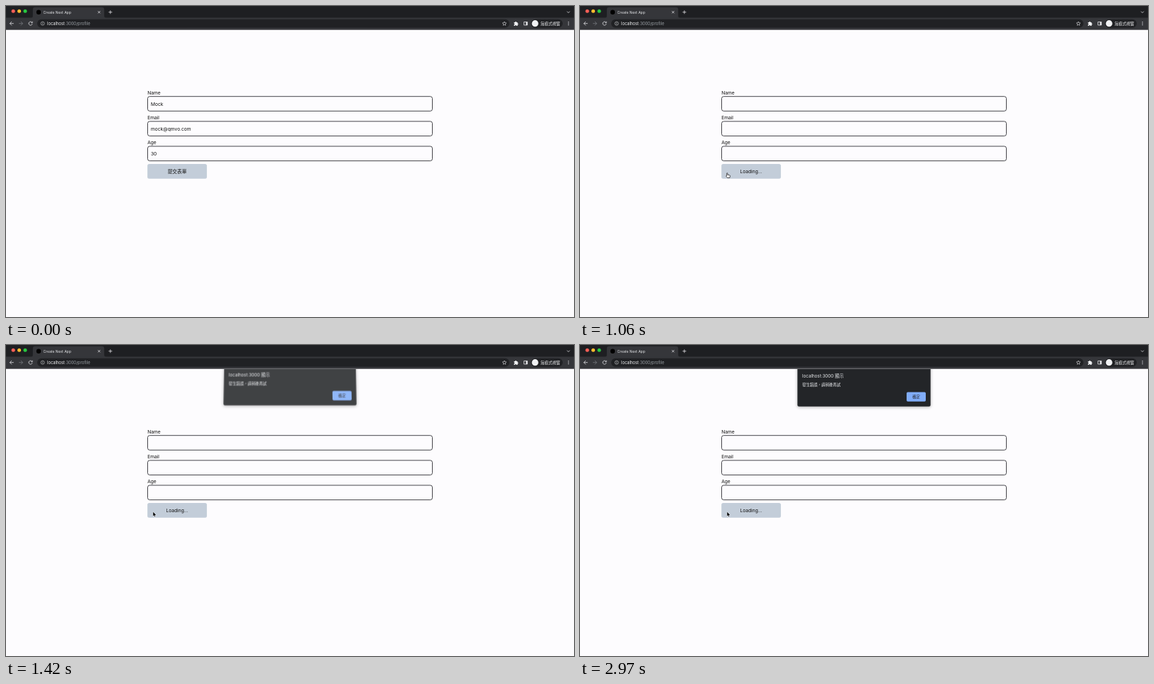
Recreate the animation shown at these times as an HTML page. Size 800 by 439 pixels, loop 3000 ms.

```html
<!DOCTYPE html>
<html lang="zh-Hant">
<head>
<meta charset="utf-8">
<title>Profile form</title>
<style>
  html, body { margin: 0; width: 800px; height: 439px; overflow: hidden; background: #fdfcfe; }
  svg { position: absolute; left: 0; top: 0; display: block; }
  text { font-family: Inter, "Noto Sans CJK TC", "Noto Sans CJK", sans-serif; white-space: pre; }
  .page text { font-size: 6.67px; fill: #111; }
  .icon { fill: none; stroke: #e2e3e6; stroke-width: .8; }
  .field { fill: #fdfcfe; stroke: #25252b; stroke-width: .85; }
  .clip { position: absolute; left: 0; top: 33.5px; width: 800px; height: 120px; overflow: hidden; }
  #dialog { left: 300px; top: -33.5px; overflow: visible; transform-origin: 100px 87px;
            filter: drop-shadow(0 1px 2px #0005); }
</style>
</head>
<body>
<svg width="800" height="439">
  <!-- tab strip -->
  <rect width="800" height="17" fill="#1e1f22"/>
  <circle cx="10.2" cy="7.2" r="2.5" fill="#ff5f57"/>
  <circle cx="18.6" cy="7.2" r="2.5" fill="#febc2e"/>
  <circle cx="27" cy="7.2" r="2.5" fill="#28c840"/>
  <path d="M34.5 17q3.3 0 3.3-3.3V5q0-3.3 3.3-3.3H135q3.3 0 3.3 3.3v8.700q0 3.300 3.300 3.300z" fill="#35363a"/>
  <circle cx="46" cy="8.7" r="3.2" fill="#000"/>
  <text x="52.6" y="10.5" font-size="5" fill="#e8eaed">Create Next App</text>
  <path class="icon" d="M129.500 7.100l3.200 3.200m0-3.200l-3.200 3.200M144.500 8.700h5m-2.500-2.500v5M790.200 7.700l1.900 1.900 1.900-1.900"/>

  <!-- toolbar -->
  <rect y="16.500" width="800" height="17.200" fill="#35363a"/>
  <rect x="44" y="18.700" width="665" height="12" rx="6" fill="#202124"/>
  <path class="icon" d="M10.800 24.700H5.400m2.700-2.700l-2.700 2.700 2.700 2.700"/>
  <path class="icon" d="M18.200 24.700h5.400m-2.700-2.700l2.700 2.700-2.700 2.700" style="stroke:#77797e"/>
  <path class="icon" d="M36.600 23.200a2.500 2.500 0 1 0 .4 2M37.200 21.800v1.900h-1.900"/>
  <circle class="icon" cx="51.600" cy="24.700" r="2.500" style="stroke-width:.55"/>
  <path class="icon" d="M51.600 24.400v1.600m0-2.900v.7" style="stroke-width:.6"/>
  <text x="58" y="26.700" font-size="5.800" fill="#f1f2f4">localhost<tspan fill="#9aa0a6">:3000/profile</tspan></text>
  <path class="icon" d="M702 22l.8 1.800 2 .2-1.500 1.300.4 2-1.700-1-1.700 1 .4-2-1.500-1.300 2-.2z" style="stroke-width:.6"/>
  <path d="M715.500 23h1.500a1 1 0 0 1 2 0h1.500v1.500a1 1 0 0 1 0 2V28h-1.700a.9.9 0 0 0-1.800 0h-1.500v-1.700a.9.9 0 0 0 0-1.800z" fill="#f1f2f4"/>
  <path class="icon" d="M729.500 22.500h4.800v4.500h-4.800z"/>
  <path d="M732.300 22.500h2v4.500h-2z" fill="#e2e3e6"/>
  <rect x="739.500" y="18.700" width="44.500" height="12" rx="6" fill="#202124"/>
  <circle cx="745.200" cy="24.700" r="4.600" fill="#f1f2f4"/>
  <text x="753" y="26.700" font-size="5.500" font-weight="500" fill="#f1f2f4">無痕式視窗</text>
  <g fill="#e2e3e6">
    <circle cx="792.200" cy="22.700" r=".6"/>
    <circle cx="792.200" cy="24.700" r=".6"/>
    <circle cx="792.200" cy="26.700" r=".6"/>
  </g>

  <!-- form -->
  <g class="page">
    <g id="fields"></g>
    <rect x="199.200" y="222.900" width="83.700" height="20.900" rx="2.500" fill="#c3cdd9"/>
    <text id="label" x="241" y="235.700" text-anchor="middle"></text>
  </g>
</svg>

<div class="clip">
  <svg id="dialog" width="200" height="110" viewBox="300 0 200 110">
    <rect x="306.300" y="24" width="187.400" height="62.700" rx="2" fill="#232528"/>
    <g fill="#e8eaed">
      <text x="313" y="45.700" font-size="6.250">localhost:3000 顯示</text>
      <text x="313" y="57.800" font-size="5.420" font-weight="500">發生錯誤，請稍後再試</text>
    </g>
    <rect x="460" y="66.500" width="27" height="13.300" rx="1.700" fill="#80acf8"/>
    <text x="473.500" y="75.100" font-size="5.300" font-weight="500" text-anchor="middle" fill="#202124">確定</text>
  </svg>
</div>

<svg width="800" height="439">
  <g id="cursor" stroke-linejoin="round">
    <path id="arrow" d="M0 0V5.600L1.300 4.400 2.200 6.400 3 6 2.100 4.100H3.900Z" fill="#000" stroke="#fff" stroke-width=".7" paint-order="stroke"/>
    <path id="hand" d="M-.6 3.800V.5a.6.6 0 0 1 1.200 0V2.500l2.700.5q.9.200.8 1.100L3.600 6.700H.3L-1.700 4.200q.3-.8 1.100-.4z" fill="#fff" stroke="#111" stroke-width=".7"/>
  </g>
</svg>

<script>
const LOOP = 3000, STEP = 30;
const SUBMIT = 880, ALERT = 1300, DROP = 1325, DROP_TIME = 172;

// time, x, y of the pointer tip
const path = [
  [30, 230.500, 257], [150, 205, 254], [300, 205, 254],
  [700, 203.900, 235.300], [820, 206, 235.400], [1060, 207.300, 235.800], [LOOP, 207.300, 235.800]
];

const $ = id => document.getElementById(id);
const show = (el, on) => el.style.visibility = on ? "visible" : "hidden";

$("fields").innerHTML = [["Name", "Mock"], ["Email", "mock@qmvo.com"], ["Age", "30"]]
  .map(([name, value], i) => `<g transform="translate(0 ${i * 35.15})">
    <text x="199.200" y="124.900">${name}</text>
    <rect class="field" x="199.500" y="127.700" width="401" height="20.600" rx="2.900"/>
    <text class="value" x="204" y="140.500">${value}</text></g>`).join("");
const values = document.querySelectorAll(".value");

function pointerAt(t) {
  const i = Math.max(1, path.findIndex(p => p[0] > t));
  const [a, b] = [path[i - 1], path[i]];
  const u = Math.max(0, (t - a[0]) / (b[0] - a[0]));
  const e = u * u * (3 - 2 * u);
  return [a[1] + (b[1] - a[1]) * e, a[2] + (b[2] - a[2]) * e];
}

function draw(t) {
  const sent = t >= SUBMIT;
  values.forEach(v => show(v, !sent));
  $("label").textContent = sent ? "Loading..." : "提交表單";

  const [x, y] = pointerAt(t);
  const over = y < 243.500 && t < ALERT;
  $("cursor").setAttribute("transform", `translate(${x} ${y})`);
  show($("hand"), t >= STEP && over);
  show($("arrow"), t >= STEP && !over);

  // The sheet swings down, its top edge tilted away
  const u = Math.min(1, Math.max(0, (t - DROP) / DROP_TIME));
  const rest = (1 - u) ** 3;
  const tilt = .0016 * rest;
  $("dialog").style.opacity = 1 - rest;
  $("dialog").style.transform = `translateY(${-12 * rest}px) ` +
    `matrix3d(1,0,0,0, 0,${1 + 40 * tilt},0,${-tilt}, 0,0,1,0, 0,0,0,1)`;
}

const start = performance.now();
function tick() {
  const t = (performance.now() - start) % LOOP;
  draw(Math.floor(t / STEP) * STEP);
  requestAnimationFrame(tick);
}
tick();
</script>
</body>
</html>
```
